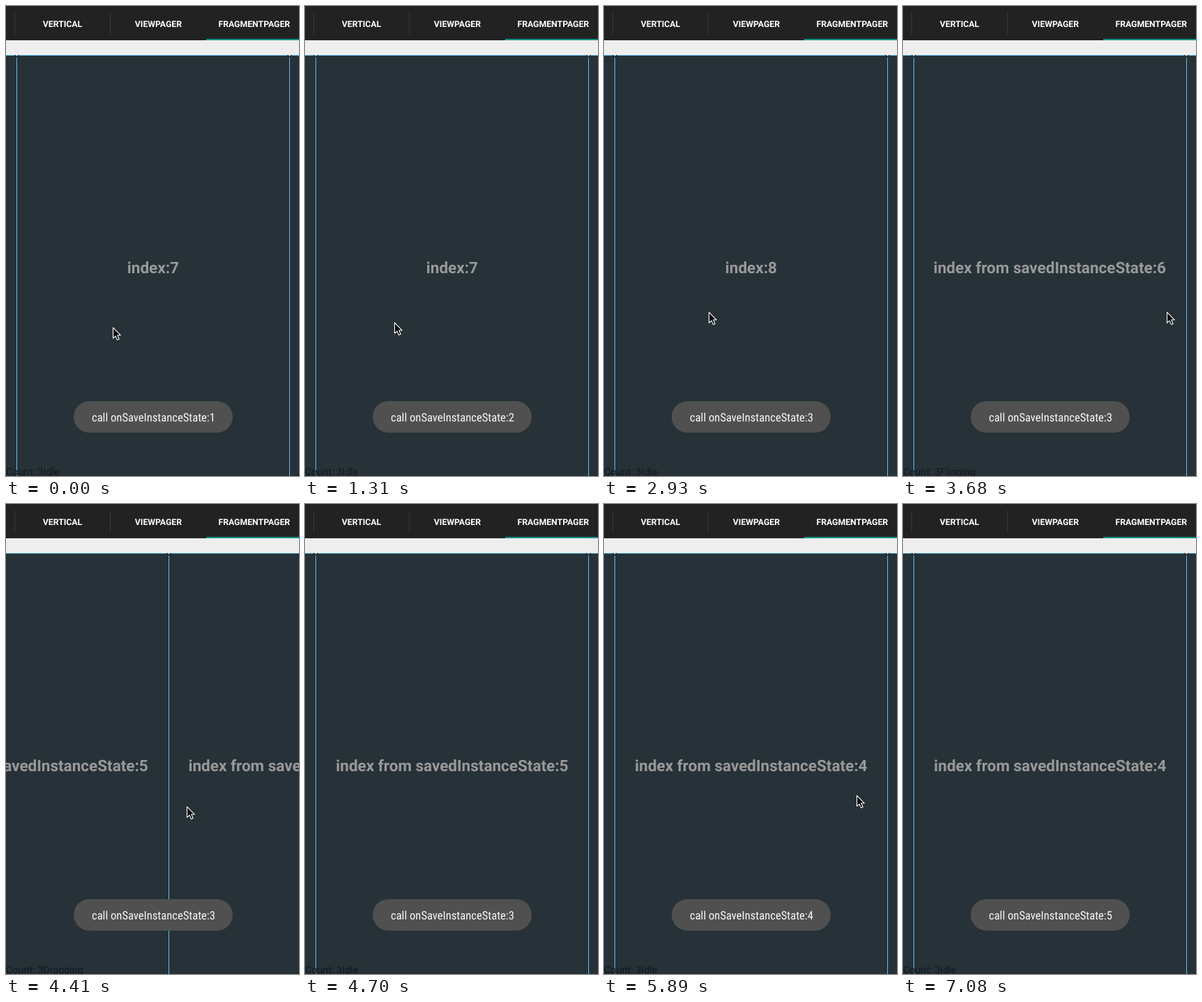
These frames come from a looping animation (420x672 px, 7.7 s). An HTML page with a canvas:

```html
<!DOCTYPE html>
<html lang="en">
<head>
<meta charset="utf-8">
<title>Fragment pager</title>
<style>
  html, body { margin: 0; width: 100%; height: 100%; overflow: hidden; background: #263238; }
  canvas { display: block; width: 420px; height: 672px; }
</style>
</head>
<body>
<canvas id="stage" width="420" height="672"></canvas>
<script>
const ctx = document.getElementById('stage').getContext('2d');
const W = 420, H = 672, LOOP = 7700, STEP = 147.5, LAST = 48;
const PITCH = 391, EDGE = 15.4, TOP = 70, RADIUS = 4;
const DARK = '#263238', BLUE = '#62c0ee';
const DRAG = 0.8; // share of a gesture during which the pointer moves

const gestures = [
  { start: 0, end: 11, pages: 0, from: 153, to: 128, y: 452 },
  { start: 13.6, end: 16, pages: 1, from: 330, to: 190, y: 437 },
  { start: 20, end: 25.5, pages: -2, from: 150, to: 378, y: 437 },
  { start: 29, end: 32, pages: -1, from: 130, to: 440, y: 425 },
  { start: 37, end: 40, pages: -1, from: 120, to: 362, y: 416 },
  { start: 41, end: 49, pages: 0, from: 362, to: 105, y: 692 }
];

const clamp = u => Math.max(0, Math.min(1, u));
const mix = (a, b, u) => a + (b - a) * u;

function pager(k) {
  let pos = 7, state = 'Idle';
  for (const g of gestures) {
    const u = clamp((k - g.start) / (g.end - g.start));
    const power = 1 + Math.abs(g.pages);
    pos += g.pages * (1 - Math.pow(1 - u, power));
    if (g.pages && u > 0 && u < 1) state = u < 0.4 ? 'Dragging' : 'Flinging';
  }
  return { pos, state };
}

function pointer(k) {
  let last = { end: 0, to: 153, y: 459 };
  for (const g of gestures) {
    if (k < g.start) {
      return [mix(last.to, g.from, (k - last.end) / (g.start - last.end)), last.y];
    }
    if (k < g.end) {
      const u = clamp((k - g.start) / (g.end - g.start) / DRAG);
      return [mix(g.from, g.to, u), mix(last.y, g.y, u)];
    }
    last = g;
  }
  return [last.to, last.y];
}

function rect(x, y, w, h, color) {
  ctx.fillStyle = color;
  ctx.fillRect(x, y, w, h);
}

function pill(x, y, w, h, r, color) {
  ctx.beginPath();
  ctx.roundRect(x, y, w, h, r);
  ctx.fillStyle = color;
  ctx.fill();
}

function text(str, x, y, font, color, align = 'center') {
  ctx.font = font;
  ctx.fillStyle = color;
  ctx.textAlign = align;
  ctx.fillText(str, x, y);
}

const roboto = (weight, size) => `${weight} ${size}px Roboto, sans-serif`;
const toastFont = '400 semi-condensed 16.6px "Roboto Condensed", Roboto, sans-serif';

function drawTabs() {
  rect(0, 0, W, 49, '#222222');
  for (const x of [12, 149]) rect(x, 9, 1, 32, '#383838');
  rect(287, 47, 133, 2, '#009688');
  ['VERTICAL', 'VIEWPAGER', 'FRAGMENTPAGER'].forEach((name, i) =>
    text(name, 81 + i * 137.4, 30, roboto(700, 12.25), '#ffffff'));
}

function drawPage(n, pos) {
  const left = EDGE + (n - pos) * PITCH;
  const x = Math.round(left);
  pill(x, TOP, PITCH + 1, H, RADIUS, DARK);
  rect(x + RADIUS, TOP, PITCH + 1 - 2 * RADIUS, 1, BLUE);
  for (const side of [x, x + PITCH]) rect(side, TOP + RADIUS, 1, H, BLUE);
  const label = n > 6 ? 'index:' : 'index from savedInstanceState:';
  text(label + n, left + PITCH / 2, 382, roboto(700, 22.5), '#999999');
}

function drawToast(count) {
  pill(97, 565, 228, 45, 22.5, '#505050');
  text('call onSaveInstanceState:' + count, 123, 594, toastFont, '#f8f8f8', 'left');
}

function drawPointer(x, y) {
  ctx.save();
  ctx.translate(Math.round(x) + 0.5, Math.round(y) + 0.8);
  ctx.fillStyle = '#000000';
  ctx.strokeStyle = '#ffffff';
  ctx.lineWidth = 1.1;
  ctx.lineJoin = 'round';
  const arrow = new Path2D('M0 0V15.2L3.5 12L6 17.6L8.6 16.5L6.2 11H10.8Z');
  ctx.fill(arrow);
  ctx.stroke(arrow);
  ctx.restore();
}

function draw(ms) {
  const k = Math.min(LAST, Math.floor((ms % LOOP + 20) / STEP));
  const { pos, state } = pager(k);
  const near = Math.round(pos);
  ctx.textRendering = 'geometricPrecision';
  rect(0, 0, W, H, '#eeeeee');
  for (let n = near - 1; n <= near + 1; n++) drawPage(n, pos);
  text('Count: 3' + state, 0, 671, roboto(400, 14.4), '#12181b', 'left');
  drawTabs();
  drawToast(1 + Math.floor((k + 9) / 14));
  drawPointer(...pointer(k));
}

const start = performance.now();
function tick() {
  draw(performance.now() - start);
  requestAnimationFrame(tick);
}
tick();
</script>
</body>
</html>
```
